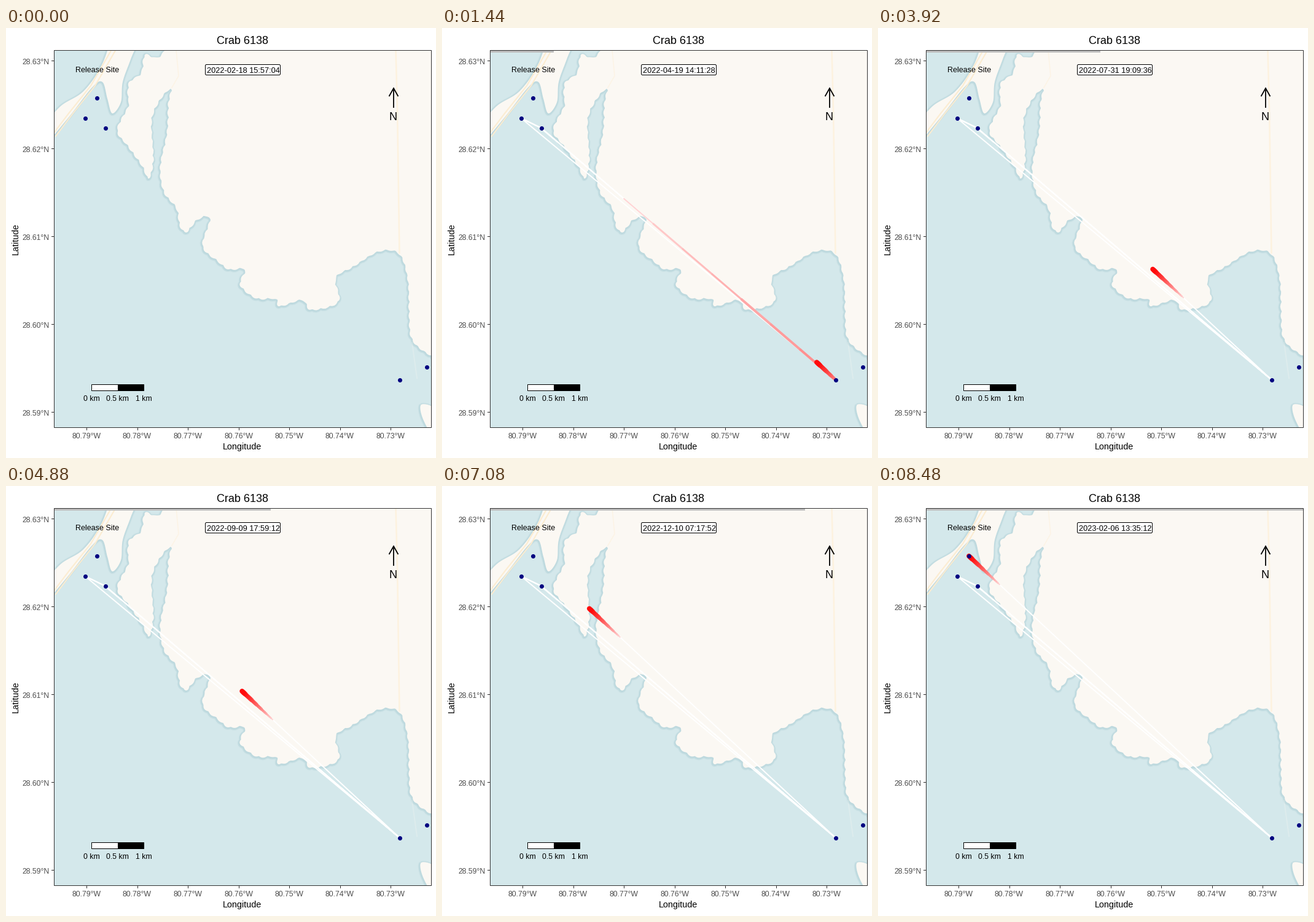
These frames come from a looping animation (700 by 700 pixels, 8.52 s). A matplotlib script:

```python
import numpy as np
import matplotlib.pyplot as plt
from matplotlib.animation import FuncAnimation
from matplotlib.collections import LineCollection
from matplotlib.patches import FancyBboxPatch, Polygon, Rectangle

FRAMES, INTERVAL, TAIL = 213, 40, 19
PX = 0.72                      # points per pixel at 100 dpi
UNIT = 2.96                    # pixels per unit of path size
START, STEP = np.datetime64("2022-02-18T15:57:04"), 143824
L, T, SIDE = 78, 36, 614       # map panel
R, B = L + SIDE, T + SIDE
WATER, LAND, SHADE, ROAD = "#d4e8eb", "#fbf8f3", "#b5d4da", "#fdf2df"

plt.rcParams["font.family"] = "Liberation Sans"
fig = plt.figure(figsize=(7, 7), dpi=100, facecolor="white")
ax = fig.add_axes([0, 0, 1, 1])
ax.set(xlim=(0, 700), ylim=(700, 0))
ax.axis("off")
panel = ax.add_patch(Rectangle((L, T), SIDE, SIDE, fc=WATER, ec="none", zorder=0))


def spline(keys, n=14):
    """Closed Catmull-Rom curve through the keys."""
    p = np.array(keys, float)
    a, c, d = (np.roll(p, k, axis=0)[:, None] for k in (1, -1, -2))
    b, t = p[:, None], np.linspace(0, 1, n, endpoint=False)[None, :, None]
    curve = 2 * b + (c - a) * t + (2 * a - 5 * b + 4 * c - d) * t**2 \
        + (3 * b - a - 3 * c + d) * t**3
    return curve.reshape(-1, 2) / 2


def scallop(curve, depth, pitch=15):
    """Push the curve out and in as a row of small bays."""
    step = np.roll(curve, -1, axis=0) - np.roll(curve, 1, axis=0)
    size = np.hypot(*step.T)
    normal = np.column_stack([-step[:, 1], step[:, 0]]) / size[:, None]
    wave = np.abs(np.sin(np.pi * np.cumsum(size / 2) / pitch)) - 0.64
    return curve + depth * wave[:, None] * normal


def land(keys, depth=0):
    shape = scallop(spline(keys), depth)
    for width in (6, 4, 2):
        edge = Polygon(shape + (-0.5, 1), fc="none", ec=SHADE, lw=width * PX,
                       alpha=0.35, joinstyle="round", zorder=1)
        ax.add_patch(edge).set_clip_path(panel)
    ax.add_patch(Polygon(shape, fc=LAND, ec="none", zorder=2)).set_clip_path(panel)


def line(points, color, width, zorder=3, clip=True, **kw):
    art, = ax.plot(*zip(*points), color=color, lw=width * PX, zorder=zorder, **kw)
    if clip:
        art.set_clip_path(panel)


def label(x, y, text, size, color="black", ha="center", **kw):
    return ax.text(x, y, text, size=size, color=color, ha=ha, va="baseline",
                   zorder=9, **kw)


def box(x, y, w, h, fc, ec="black", zorder=7):
    return ax.add_patch(Rectangle((x, y), w, h, fc=fc, ec=ec, lw=PX, zorder=zorder))


# Mainland, barrier strip and south-east islet
land([(290, -20), (266, 25), (247, 48), (226, 44), (220, 73), (201, 88), (198, 110),
      (199, 127), (181, 166), (198, 192), (221, 224), (232, 245), (240, 215),
      (237, 153), (249, 120), (268, 99), (264, 125), (262, 170), (251, 226),
      (257, 267), (277, 293), (283, 322), (294, 332), (312, 312), (332, 310),
      (320, 355), (345, 380), (363, 393), (389, 393), (381, 418), (407, 440),
      (438, 441), (446, 453), (482, 443), (497, 459), (541, 446), (537, 407),
      (565, 389), (607, 364), (640, 368), (654, 410), (656, 465), (661, 507),
      (692, 534), (760, 570), (760, -20)], depth=2.5)
land([(60, 192), (100, 148), (140, 97), (157, 88), (165, 115), (173, 139), (187, 121),
      (190, 88), (203, 51), (225, -10), (185, -10), (156, 60), (126, 103),
      (88, 128), (60, 165)])
land([(676, 613), (700, 623), (700, 670), (679, 637)])

# Roads
for dx in (0, 7):
    line([(74 + dx, 176), (102 + dx, 139), (138 + dx, 94), (172 + dx, 35)],
         "#fcecd0", 2)
line([(634.5, 36), (637, 130), (640.5, 366)], ROAD, 2.5)
line([(277, 36), (281, 78), (270, 97)], ROAD, 1.5, alpha=0.7)
line([(661, 512), (669, 570)], LAND, 2, alpha=0.25)

# Frame, ticks and titles
box(L, T, SIDE, SIDE, "none", "#333333", 8)
for i in range(7):
    x = 131 + 82.5 * i
    line([(x, B), (x, B + 4)], "#333333", 1, clip=False)
    label(x, 668, f"80.{79 - i}°W", 8.8, "#4d4d4d")
for i in range(5):
    y = 53 + 143 * i
    line([(L - 4, y), (L, y)], "#333333", 1, clip=False)
    label(71, y + 6, f"28.{63 - i}°N", 8.8, "#4d4d4d", ha="right")
label(385, 26, "Crab 6138", 13)
label(384.5, 686, "Longitude", 10.4)
label(20, 343.5, "Latitude", 10.4, rotation=90, rotation_mode="anchor")
label(148.5, 71.5, "Release Site", 9)

# North arrow and scale bar
line([(631, 129), (631, 98)], "black", 1.8, 7)
line([(624, 110.5), (631, 98), (638, 110.5)], "black", 1.8, 7)
label(630.5, 149.5, "N", 13)
for i, text in enumerate(("0 km", "0.5 km", "1 km")):
    x = 139 + 42.7 * i
    if i < 2:
        box(x, 580, 42.7, 10, ("white", "black")[i])
    label(x, 607, text, 8.8)

# Clock
ax.add_patch(FancyBboxPatch((326.5, 61.5), 118, 13, fc="white", ec="black", lw=PX,
                            boxstyle="round,pad=2,rounding_size=2", zorder=8))
clock = label(327, 73, "", 9.15, ha="left")

# Receivers, and the track as straight moves between them
north, west, bay, far, east = (148, 114), (129, 147), (162, 163), (641, 573), (685, 552)
ax.scatter(*zip(north, west, bay, far, east), s=(7 * PX) ** 2, c="navy", lw=0, zorder=6)
visits = {0: west, 1: west, 6: far, 11: bay, 12: west, 14.2: bay, 24.2: far, 212: north}
track = np.column_stack([np.interp(np.arange(FRAMES), list(visits), c)
                         for c in zip(*visits.values())])

trace, = ax.plot([], [], color="white", lw=int(UNIT) * PX, zorder=4,
                 solid_capstyle="round", solid_joinstyle="round")
tail = ax.add_collection(LineCollection([], capstyle="round", zorder=5),
                         autolim=False)
bar = ax.add_patch(Rectangle((L, T), 0, 4, fc="#bebebe", ec="none", zorder=7))


def update(i):
    trace.set_data(*track[:i + 1].T)
    pts = track[max(0, i - TAIL):i + 1]
    n = len(pts)
    order = np.arange(n - 1)
    fade = (n - 1 - order) / (n + 3)
    tail.set_segments(np.stack([pts[:-1], pts[1:]], axis=1))
    tail.set_linewidths(PX * np.floor(UNIT * (1 + 2 * order / max(n - 1, 1))))
    tail.set_color(np.column_stack([np.ones(n - 1), fade, fade]))
    bar.set_width(SIDE * i / (FRAMES - 1))
    now = START + np.timedelta64(STEP * i, "s")
    clock.set_text(str(now).replace("T", " "))
    return trace, tail, bar, clock


anim = FuncAnimation(fig, update, frames=FRAMES, interval=INTERVAL,
                     repeat=True, repeat_delay=0)
plt.show()
```
